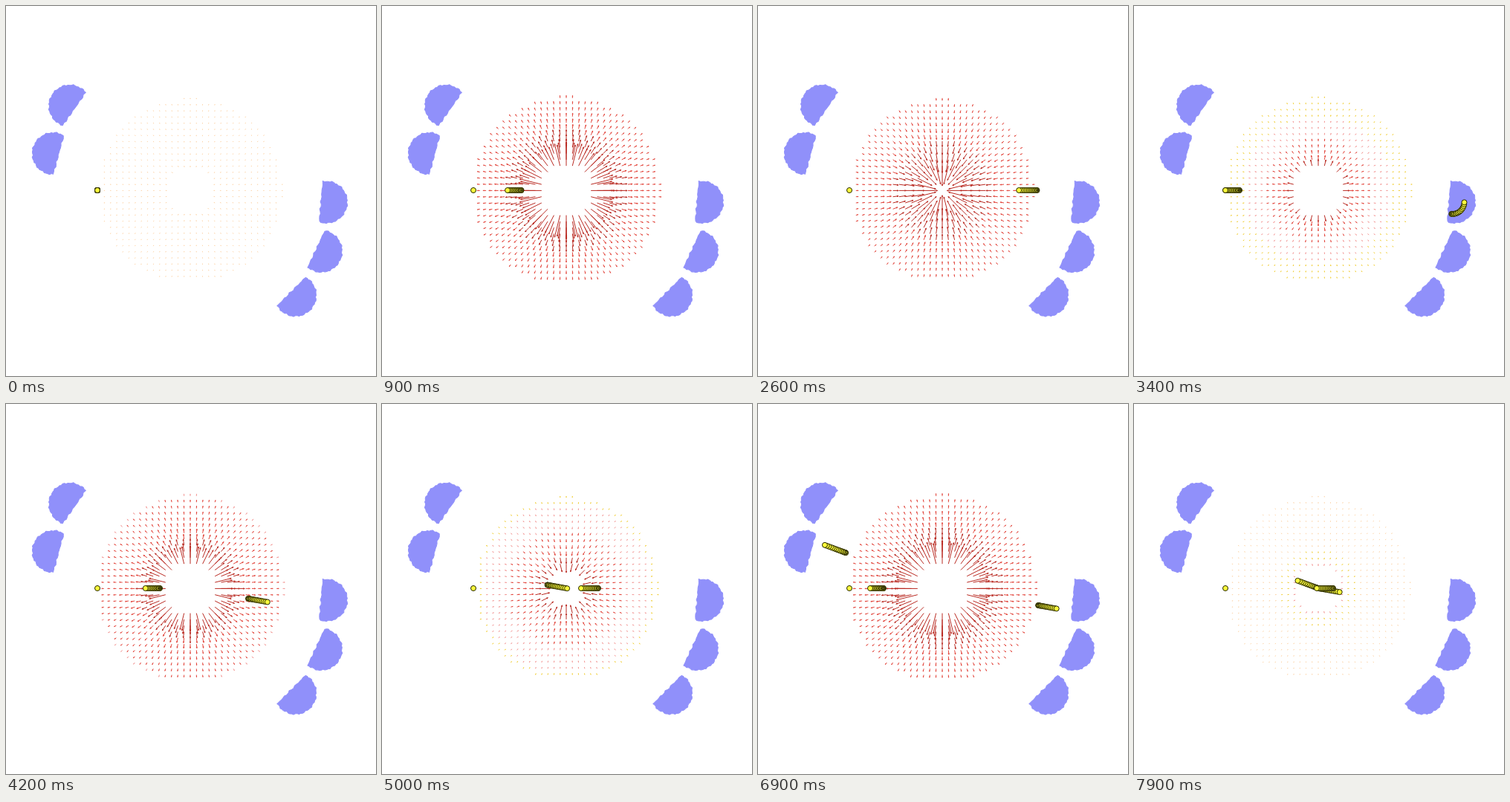
These frames come from a looping animation (498x498 px, 8000 ms). An HTML page with a canvas:

```html
<!DOCTYPE html>
<html lang="en">
<head>
<meta charset="utf-8">
<title>Electron bunches in a radial field</title>
<style>
html, body { margin: 0; width: 100%; height: 100%; overflow: hidden; background: #fff; }
canvas { display: block; }
</style>
</head>
<body>
<canvas id="stage" width="498" height="498"></canvas>
<script>
const ctx = document.getElementById('stage').getContext('2d');
const LOOP = 8000, STEP = 100, PERIOD = 3100;
const C = 248, GRID = 8.3, TURN = 10.1 * Math.PI / 180;
const START = 125;               // injection distance from the centre
const BENDS = [180.6, 185];      // distance at which each bend begins
const MAGNETS = [177, 184, 187.5, 191, 193];
const BALLS = 16;

// [ms since injection, distance travelled]
const HEAD = [[0, 0], [300, 19], [700, 46], [1700, 145], [1900, 168], [3000, 302], [3400, 357],
  [3800, 408], [5000, 565], [6100, 716], [6900, 825], [7900, 963]];
const TAIL = [[300, 0], [700, 28], [1700, 123], [1900, 145], [3000, 277], [3400, 331],
  [3800, 383], [4800, 510], [5000, 538], [6100, 685], [6900, 795], [7900, 934]];

// Smooth curve through the points, clamped at both ends
function curve(pts, t) {
  const last = pts.length - 1;
  if (t <= pts[0][0]) return pts[0][1];
  if (t >= pts[last][0]) return pts[last][1];
  const i = pts.findIndex(p => p[0] > t) - 1;
  const slope = k => {
    const a = pts[Math.max(k - 1, 0)], b = pts[Math.min(k + 1, last)];
    return (b[1] - a[1]) / (b[0] - a[0]);
  };
  const [t0, s0] = pts[i], [t1, s1] = pts[i + 1];
  const h = t1 - t0, u = (t - t0) / h, v = 1 - u;
  return s0 * v * v * (1 + 2 * u) + s1 * u * u * (3 - 2 * u)
    + h * u * v * (slope(i) * v - slope(i + 1) * u);
}

const polar = (r, a, x = C, y = C) => [x + r * Math.cos(a), y + r * Math.sin(a)];

// Straight passes through the centre, joined by clockwise bends
function pathPoint(s) {
  let from = START;
  for (let k = 0; ; k++) {
    const dir = k * (TURN + Math.PI), out = BENDS[k];
    if (out === undefined || s < from + out) return polar(s - from, dir);
    s -= from + out;
    const r = out * Math.tan(TURN / 2), bend = r * (Math.PI + TURN);
    if (s < bend) {
      const mid = polar(out / Math.cos(TURN / 2), dir + TURN / 2);
      return polar(r, dir - Math.PI / 2 + s / r, ...mid);
    }
    s -= bend;
    from = out;
  }
}

function drawMagnet(dist, k) {
  const wobble = i => 0.6 * Math.sin(i * 2.3 + k) + 0.5 * Math.sin(i * 1.1 + 2 * k);
  ctx.save();
  ctx.translate(C, C);
  ctx.rotate((k * 10 + 5) * Math.PI / 180 + k * Math.PI);
  ctx.translate(dist, 0);
  ctx.beginPath();
  for (let i = -21; i <= 21; i++) ctx.lineTo(...polar(28 + wobble(i), i * Math.PI / 36, 7, 0));
  for (let i = 1; i < 16; i++) ctx.lineTo(wobble(i * 2) - 0.3, 26 - i * 3.25);
  ctx.closePath();
  ctx.fillStyle = ctx.strokeStyle = '#9090fa';
  ctx.lineJoin = 'round';
  ctx.lineWidth = 1;
  ctx.fill();
  ctx.stroke();
  ctx.restore();
}

function fieldColor(m) {
  if (m < 0.128) return '#fbd3a8';
  if (m < 0.165) return '#f0cd35';
  if (m < 0.23) return '#f29a98';
  return m < 0.42 ? '#e2463d' : '#b92a22';
}

function drawArrow(x, y, dir, size, color) {
  const tip = polar(size, dir, x, y), head = Math.min(2.4, 0.6 + size * 0.3);
  ctx.strokeStyle = ctx.fillStyle = color;
  ctx.lineWidth = 1;
  ctx.beginPath();
  ctx.moveTo(x, y);
  ctx.lineTo(...tip);
  ctx.stroke();
  ctx.beginPath();
  ctx.moveTo(...polar(0.5, dir, ...tip));
  ctx.lineTo(...polar(head, dir + 2.6, ...tip));
  ctx.lineTo(...polar(head, dir - 2.6, ...tip));
  ctx.fill();
}

function drawField(t) {
  const e = Math.sin(2 * Math.PI * (t - 48) / PERIOD);
  for (let j = -15; j <= 14; j++) {
    for (let i = -14; i <= 15; i++) {
      const n = Math.hypot(i, j);
      if (n < 3.9 || n > 15.1) continue;
      const m = Math.abs(e) * 4 / n;
      const dir = Math.atan2(j, i) + (e < 0 ? Math.PI : 0);
      drawArrow(C + i * GRID, C + 0.4 + j * GRID, dir, 1.2 + 32 * m * m, fieldColor(m));
    }
  }
}

function drawBall(s) {
  ctx.beginPath();
  ctx.arc(...pathPoint(s), 3.5, 0, 2 * Math.PI);
  ctx.fillStyle = '#ffff3c';
  ctx.fill();
  ctx.strokeStyle = '#222200';
  ctx.lineWidth = 1;
  ctx.stroke();
}

function drawBunch(age) {
  const head = curve(HEAD, age), tail = curve(TAIL, age);
  for (let i = 0; i < BALLS; i++) {
    drawBall(head - (head - tail) * (i / (BALLS - 1)) ** 1.5);
  }
}

function draw(now) {
  const t = Math.floor(now % LOOP / STEP) * STEP;
  ctx.clearRect(0, 0, 498, 498);
  MAGNETS.forEach(drawMagnet);
  drawField(t);
  for (let born = 0; born <= t; born += PERIOD) drawBunch(t - born);
  drawBall(0);
}

const begin = performance.now();
function tick() {
  draw(performance.now() - begin);
  requestAnimationFrame(tick);
}
tick();
</script>
</body>
</html>
```
